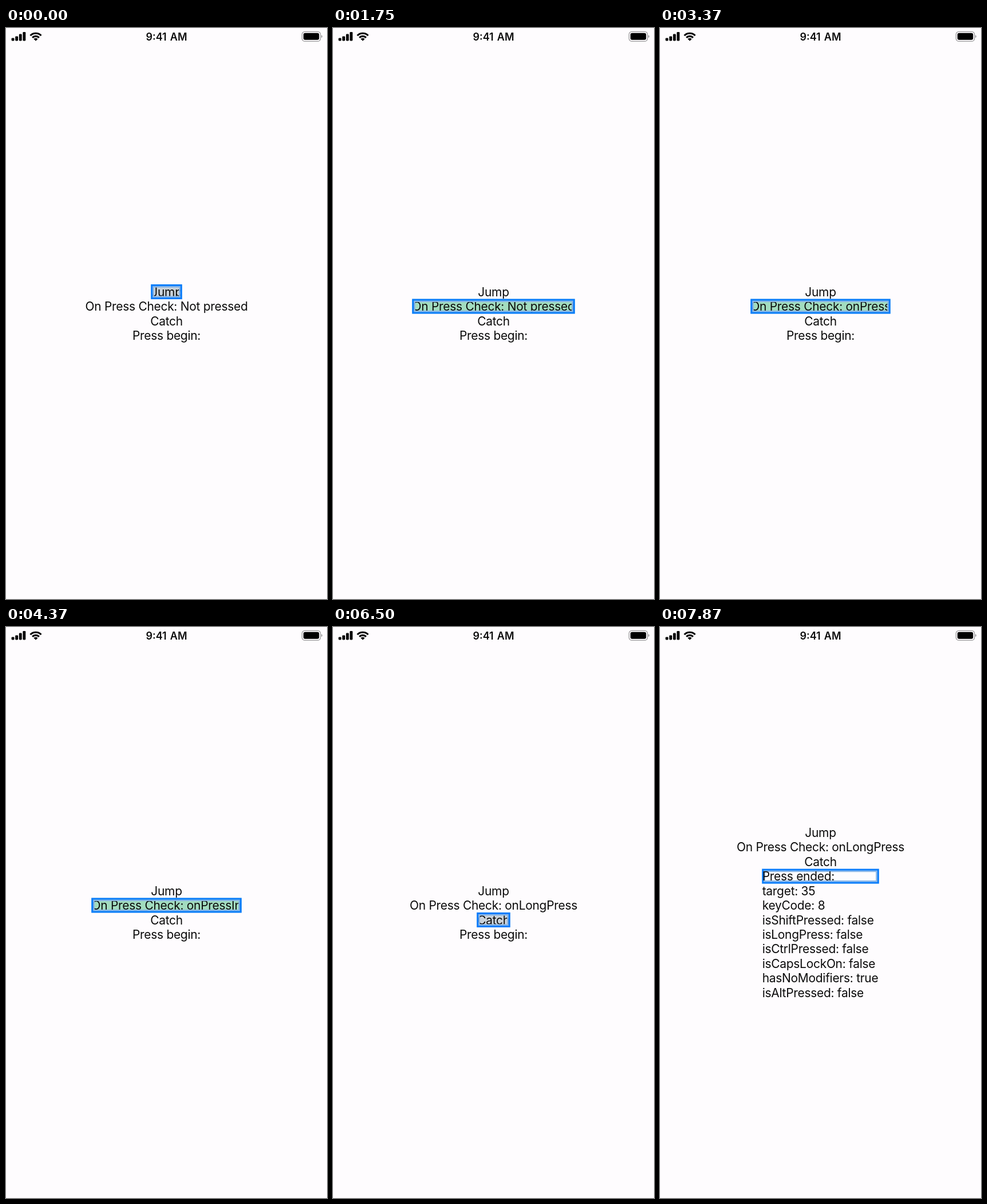
Animation, 561 px wide and 998 px high, one loop 8000 ms. Source, as an HTML page:

```html
<!DOCTYPE html>
<html lang="en">
<head>
<meta charset="utf-8">
<title>Key press focus</title>
<style>
  html, body { margin: 0; width: 100%; height: 100%; overflow: hidden; background: #fefcfe; }
  svg { display: block; width: 100vw; height: 100vh; }
  text { font-family: Inter, "Liberation Sans", sans-serif; font-optical-sizing: none; fill: #0b0b0b; white-space: pre; }
  .row { font-size: 20.94px; letter-spacing: -0.27px; }
  .clock { font-size: 18px; font-weight: 600; word-spacing: 1.6px; text-anchor: middle; }
</style>
</head>
<body>
<svg viewBox="0 0 561 998" xmlns="http://www.w3.org/2000/svg">
  <rect width="561" height="998" fill="#fefcfe"/>
  <g id="bars"></g>
  <g fill="none" stroke="#000">
    <path id="wave1" stroke-width="3.1"/>
    <path id="wave2" stroke-width="3.1"/>
    <path id="wave3" stroke-width="4.8"/>
  </g>
  <text class="clock" x="280.5" y="22">9:41 AM</text>
  <rect x="517.4" y="6.3" width="32.2" height="17" rx="4.8" fill="none" stroke="#9c9b9d" stroke-width="1.3"/>
  <rect x="519.8" y="8.8" width="27.4" height="12" rx="3" fill="#000"/>
  <path d="M551 12.2a2.6 2.6 0 0 1 0 5z" fill="#9c9b9d"/>
  <g id="view"></g>
</svg>
<script>
const LOOP = 8000, CX = 280.5, CY = 499, ROW = 25.43, BASE = 20.6;
const LIST_X = 178.7, LIST_HALF = 102;
const GREY = "#cad2d9", GREEN = "#a2dcbf";
const $ = id => document.getElementById(id);

const details = [
  "target: 35", "keyCode: 8", "isShiftPressed: false", "isLongPress: false",
  "isCtrlPressed: false", "isCapsLockOn: false", "hasNoModifiers: true", "isAltPressed: false"
];

// at: start time, check: text of row 1, focus: focused row, half: half width of its frame
const scenes = [
  { at: 0,    check: "Not pressed", focus: 0, half: 27,   fill: GREY },
  { at: 500,  check: "Not pressed", focus: 2, half: 29,   fill: GREY },
  { at: 1750, check: "Not pressed", focus: 1, half: 142,  fill: GREEN },
  { at: 2870, check: "onPressIn",   focus: 1, half: 131,  fill: GREEN },
  { at: 3000, check: "onPress",     focus: 1, half: 122,  fill: GREEN },
  { at: 3500, check: "onPressIn",   focus: 1, half: 131,  fill: GREEN },
  { at: 4500, check: "onLongPress", focus: 1, half: 146,  fill: GREEN },
  { at: 6500, check: "onLongPress", focus: 2, half: 29,   fill: GREY },
  { at: 7000, check: "onLongPress", focus: 3, half: 60.5 },
  { at: 7500, check: "onLongPress", focus: 3, half: LIST_HALF, list: "begin" },
  { at: 7620, check: "onLongPress", focus: 3, half: LIST_HALF, list: "ended" }
];

function box(half, top, inset, attrs) {
  return `<rect x="${CX - half + inset}" y="${top + inset}" width="${2 * (half - inset)}" height="${ROW - 2 * inset}" ${attrs}/>`;
}

function render(s) {
  const rows = ["Jump", "On Press Check: " + s.check, "Catch", `Press ${s.list || "begin"}:`];
  if (s.list) rows.push(...details);
  const y0 = CY - rows.length * ROW / 2;
  const top = y0 + s.focus * ROW + 0.2;

  const label = (str, i) => {
    const left = s.list && i > 2;
    const y = Math.round(y0 + i * ROW + BASE);
    return `<text class="row" x="${left ? LIST_X : CX}" y="${y}" text-anchor="${left ? "start" : "middle"}">${str}</text>`;
  };
  const texts = rows.map(label).join("");
  const back = s.fill ? box(s.half, top, 0, `fill="${s.fill}"`) : "";
  const halo = box(s.half, top, 4, 'fill="none" stroke="#8ab7e8" stroke-width="2.6"')
             + box(s.half, top, 1.25, 'fill="none" stroke="#0b7dfb" stroke-width="3.1"');
  // the halo covers filled rows but lies under the press list
  return back + (s.fill ? texts + halo : halo + texts);
}

function drawStatus() {
  $("bars").innerHTML = [5, 8, 11.8, 15.4].map((h, i) =>
    `<rect x="${9.6 + i * 6.6}" y="${22.4 - h}" width="4.9" height="${h}" rx="1.3"/>`).join("");
  [13.4, 8.3, 2.6].forEach((r, i) => {
    const d = r * Math.SQRT1_2;
    $("wave" + (i + 1)).setAttribute("d", `M${52 - d} ${22.7 - d}A${r} ${r} 0 0 1 ${52 + d} ${22.7 - d}`);
  });
}

let shown = null;
const start = performance.now();
function frame(now) {
  const t = Math.max(0, now - start) % LOOP;
  const scene = scenes.filter(s => s.at <= t).pop();
  if (scene !== shown) {
    $("view").innerHTML = render(scene);
    shown = scene;
  }
  requestAnimationFrame(frame);
}

drawStatus();
frame(start);
</script>
</body>
</html>
```
